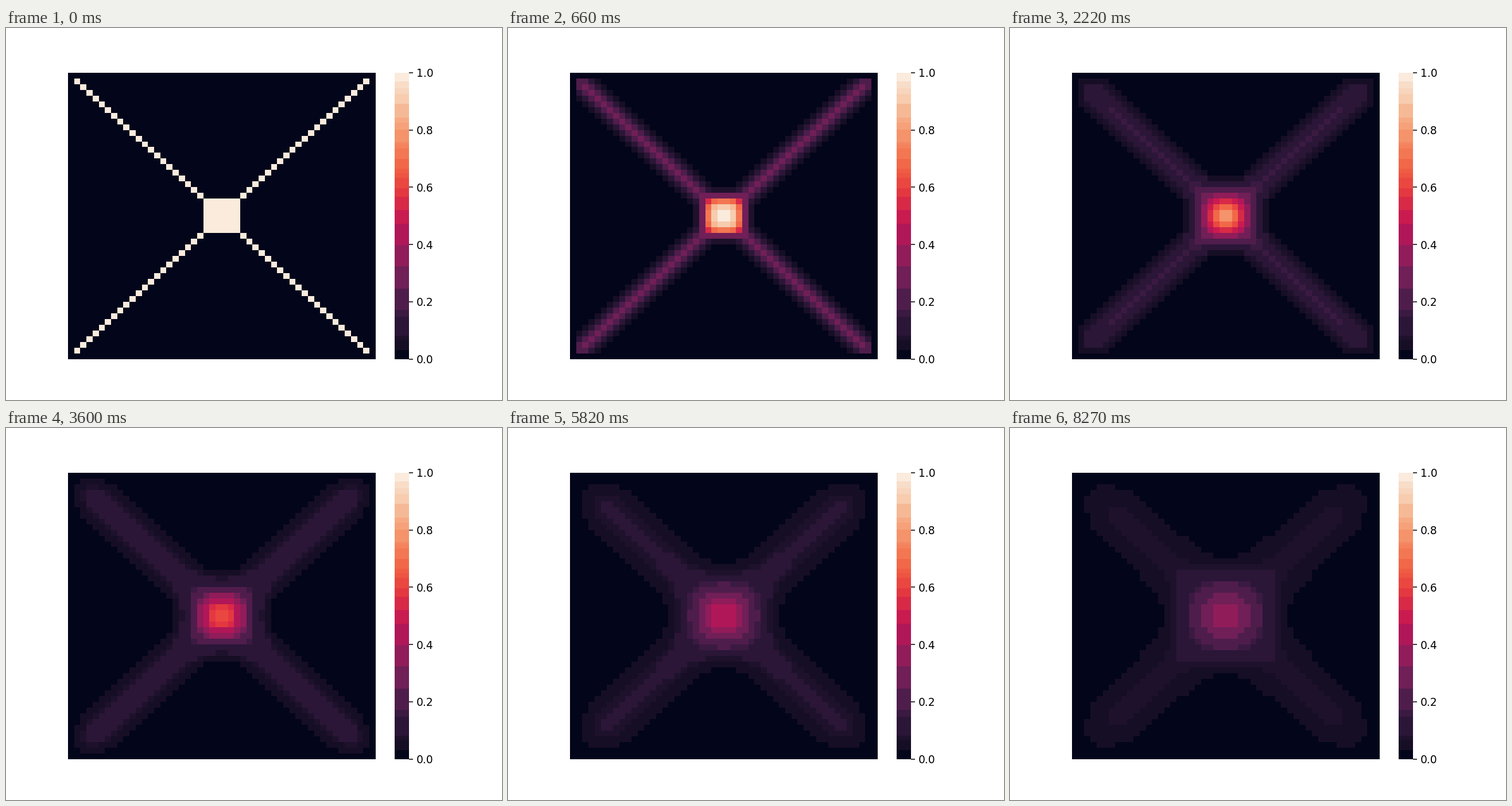
These frames come from a looping animation (864x648 px, 8.42 s). A matplotlib script:

```python
import numpy as np
import matplotlib.pyplot as plt
from matplotlib.animation import FuncAnimation
from matplotlib.colors import LinearSegmentedColormap, ListedColormap

SIZE = 50
STEPS = 281
RATE = 0.025
FRAMES, INTERVAL = 421, 20

STOPS = [(0, "#03051a"), (0.05, "#160e25"), (0.1, "#261433"), (1 / 7, "#35193e"),
         (0.2, "#4c1d4b"), (2 / 7, "#701f57"), (0.4, "#a11a5b"), (3 / 7, "#ad1759"),
         (0.5, "#cb1b4f"), (4 / 7, "#e13342"), (0.6, "#e83f3f"), (0.65, "#f05a42"),
         (5 / 7, "#f37651"), (0.8, "#f69c73"), (6 / 7, "#f6b48f"), (0.9, "#f7c9ab"),
         (0.95, "#f8dac4"), (1, "#faebdd")]
BAND_EDGES = [0.03, 0.068, 0.082, 0.148, 0.170, 0.246, 0.325, 0.399, 0.471, 0.519,
              0.567, 0.599, 0.631, 0.647, 0.663, 0.699, 0.733, 0.749, 0.758, 0.800,
              0.823, 0.844, 0.890, 0.926, 0.946, 0.970]


def banded_cmap():
    """Smooth dark-to-cream ramp reduced to one flat colour per band."""
    ramp = LinearSegmentedColormap.from_list("ramp", STOPS, N=1024)
    edges = np.array([0, *BAND_EDGES, 1])
    centers = (edges[:-1] + edges[1:]) / 2
    centers[0], centers[-1] = 0, 1
    levels = (np.arange(256) + 0.5) / 256
    return ListedColormap(ramp(centers[np.searchsorted(BAND_EDGES, levels)]))


def initial_plate():
    plate = np.zeros((SIZE, SIZE))
    inner = np.arange(1, SIZE - 1)
    plate[inner, inner] = 1
    plate[inner, SIZE - 1 - inner] = 1
    plate[22:28, 22:28] = 1
    return plate


def diffuse(u):
    """One explicit heat-equation step with cold, fixed borders."""
    out = u.copy()
    out[1:-1, 1:-1] += RATE * (u[2:, 1:-1] + u[:-2, 1:-1] + u[1:-1, 2:]
                               + u[1:-1, :-2] - 4 * u[1:-1, 1:-1])
    return out


states = [initial_plate()]
for _ in range(STEPS - 1):
    states.append(diffuse(states[-1]))

fig, ax = plt.subplots(figsize=(6.4, 4.8), dpi=135)
mesh = ax.pcolormesh(states[0], cmap=banded_cmap(), vmin=0, vmax=1)
ax.invert_yaxis()
ax.axis("off")
colorbar = fig.colorbar(mesh, ax=ax)
colorbar.outline.set_linewidth(0)


def update(frame):
    step = min(int(frame * STEPS / FRAMES + 0.5), STEPS - 1)
    mesh.set_array(states[step])
    return [mesh]


anim = FuncAnimation(fig, update, frames=FRAMES, interval=INTERVAL,
                     repeat=True, repeat_delay=0)
plt.show()
```
